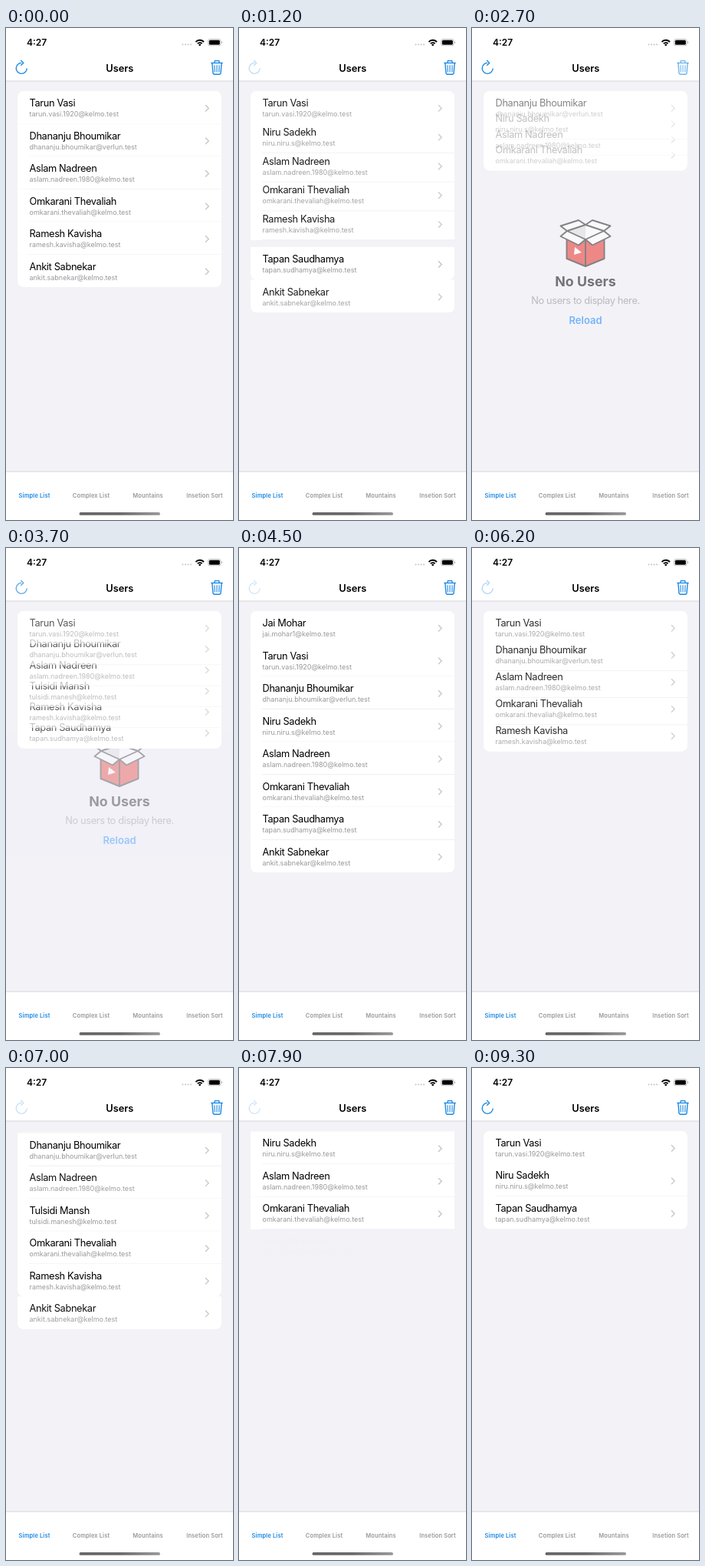
Write an HTML page with a canvas that moves like this. It is 296 px wide and 640 px high and loops after 9400 ms.

```html
<!DOCTYPE html>
<html lang="en">
<head>
<meta charset="utf-8">
<title>Users</title>
<style>
html, body { margin: 0; width: 100%; height: 100%; overflow: hidden; background: #f2f2f7; }
canvas { display: block; }
</style>
</head>
<body>
<canvas id="stage" width="296" height="640"></canvas>
<script>
const ctx = document.getElementById('stage').getContext('2d');
const LOOP = 9400, MOVE = 400, ROW = 42.5, TOP = 82;
const BLUE = '#1c88e2', BG = '#f2f2f7';

const users = [
  ['Jai Mohar', 'jai.mohar1@kelmo.test'],
  ['Tarun Vasi', 'tarun.vasi.1920@kelmo.test'],
  ['Dhananju Bhoumikar', 'dhananju.bhoumikar@verlun.test'],
  ['Niru Sadekh', 'niru.niru.s@kelmo.test'],
  ['Aslam Nadreen', 'aslam.nadreen.1980@kelmo.test'],
  ['Tulsidi Mansh', 'tulsidi.manesh@kelmo.test'],
  ['Omkarani Thevaliah', 'omkarani.thevaliah@kelmo.test'],
  ['Ramesh Kavisha', 'ramesh.kavisha@kelmo.test'],
  ['Tapan Saudhamya', 'tapan.sudhamya@kelmo.test'],
  ['Ankit Sabnekar', 'ankit.sabnekar@kelmo.test']
];

// Each tap: release time and the users shown afterwards; an empty list means the trash was tapped.
const taps = [
  [-2000, '124679'], [-1000, '124679'], [130, '02358'], [600, '1346789'], [1080, '0258'],
  [1580, '2346'], [2498, ''], [3480, '124578'], [4090, '01234689'], [4540, '13679'],
  [5010, '38'], [5540, '12467'], [6060, '03589'], [6440, '245679'], [6900, '023567'],
  [7375, '346'], [7848, '134679'], [8350, '02458'], [8910, '138']
].map(([time, ids]) => ({ time, ids: [...ids].map(Number) }));

const clamp = v => Math.max(0, Math.min(1, v));
const ease = p => p < .5 ? 4 * p ** 3 : 1 - 4 * (1 - p) ** 3;
const mix = (a, b, p) => a + (b - a) * p;

function text(str, x, y, size, color, weight = 400, align = 'left', spacing = 0) {
  ctx.font = `${weight} ${size}px Inter, sans-serif`;
  ctx.letterSpacing = spacing + 'px';
  ctx.textAlign = align;
  ctx.fillStyle = color;
  ctx.fillText(str, x, y);
}

function trace(points, close) {
  ctx.beginPath();
  for (let i = 0; i < points.length; i += 2) ctx.lineTo(points[i], points[i + 1]);
  if (close) ctx.closePath();
}

function line(points, color, width) {
  trace(points);
  ctx.strokeStyle = color;
  ctx.lineWidth = width;
  ctx.stroke();
}

function pill(x, y, w, h, r, fill) {
  ctx.beginPath();
  ctx.roundRect(x, y, w, h, r);
  ctx.fillStyle = fill;
  ctx.fill();
}

function withAlpha(alpha, draw) {
  ctx.save();
  ctx.globalAlpha = alpha;
  draw();
  ctx.restore();
}

// Slot in `list` just below the nearest row above `id` that is in both lists.
function slot(id, own, list) {
  const above = own.slice(0, own.indexOf(id)).filter(u => list.includes(u)).pop();
  return above === undefined ? 0 : list.indexOf(above) + 1;
}

function drawCard({ id, list, at }) {
  const first = id === list[0] ? 8 : 0, last = id === list.at(-1) ? 8 : 0;
  pill(15, TOP + at * ROW, 266, ROW, [first, first, last, last], '#fff');
}

function drawRow(row) {
  const { id, list, at } = row, y = TOP + at * ROW;
  drawCard(row);
  text(users[id][0], 30.5, y + 20, 12.8, '#000', 400, 'left', -.35);
  text(users[id][1], 30.5, y + 33, 9, '#97979b');
  line([260, y + 18.2, 264.2, y + 22.4, 260, y + 26.6], '#c2c2c6', 1.3);
  if (id !== list[0] && id !== list.at(-1)) line([30, y + ROW, 281, y + ROW], '#ededf0', .8);
}

// Upper rows overlap lower ones; the cards fade later than their contents.
function drawFading(rows, alpha) {
  if (alpha <= 0) return;
  withAlpha(Math.min(1, alpha * 2), () => rows.forEach(drawCard));
  withAlpha(alpha, () => rows.reverse().forEach(drawRow));
}

function drawList(from, to, p) {
  const inserted = to.filter(id => !from.includes(id));
  const deleted = from.filter(id => !to.includes(id));
  const kept = to.filter(id => from.includes(id));
  drawFading(inserted.map(id => ({ id, list: to, at: mix(slot(id, to, from), to.indexOf(id), p) })), p);
  drawFading(deleted.map(id => ({ id, list: from, at: mix(from.indexOf(id), slot(id, from, to), p) })), 1 - p);
  for (const id of kept) drawRow({ id, list: to, at: mix(from.indexOf(id), to.indexOf(id), p) });
}

function drawBox() {
  const shape = (points, fill) => {
    trace(points, true);
    ctx.fillStyle = fill;
    ctx.fill();
    ctx.strokeStyle = '#1c1c1e';
    ctx.lineWidth = 1.9;
    ctx.stroke();
  };
  const mirror = points => points.map((v, i) => i % 2 ? v : 296 - v);
  ctx.lineJoin = 'round';
  for (const side of [p => p, mirror]) {
    shape(side([123.5, 266, 148, 276, 148, 310, 123.5, 300]), '#e8261f');
    trace(side([148, 256, 124, 264, 148, 275]), true);
    ctx.fillStyle = side === mirror ? '#fff' : '#dcdce0';
    ctx.fill();
  }
  for (const side of [p => p, mirror]) {
    shape(side([148, 256, 139, 250, 115.5, 257.5, 124, 264]), '#fff');
    shape(side([124, 264, 148, 275, 139, 282.5, 115.5, 271]), '#fff');
  }
  trace([134, 285, 143, 292, 133, 295], true);
  ctx.fillStyle = '#fff';
  ctx.fill();
}

// Drawn solid and then veiled, so that overlapping shapes fade as one.
function drawEmpty(alpha) {
  if (alpha <= 0) return;
  drawBox();
  text('No Users', 148, 335.5, 17.8, '#000', 700, 'center');
  text('No users to display here.', 148, 358.5, 12.8, '#85858a', 400, 'center', -.35);
  text('Reload', 148, 385, 13, '#007aff', 600, 'center');
  withAlpha(1 - alpha, () => {
    ctx.fillStyle = BG;
    ctx.fillRect(0, 240, 296, 160);
  });
}

function drawRefresh() {
  ctx.beginPath();
  ctx.arc(20.2, 52.4, 7, 0, Math.PI * 1.5);
  ctx.strokeStyle = BLUE;
  ctx.lineWidth = 1.4;
  ctx.stroke();
  line([19.3, 42, 22.7, 45.4, 19.3, 48.8], BLUE, 1.4);
}

function drawTrash() {
  line([267.3, 45.5, 282.7, 45.5], BLUE, 1.4);
  line([271.8, 45, 272.3, 42.7, 277.7, 42.7, 278.2, 45], BLUE, 1.3);
  line([268.8, 45.5, 270, 59, 271.3, 60.3, 278.7, 60.3, 280, 59, 281.2, 45.5], BLUE, 1.4);
  for (const dx of [-2.8, 0, 2.8]) line([275 + dx * 1.1, 48.3, 275 + dx, 57.5], BLUE, 1.1);
}

function drawStatus() {
  text('4:27', 27, 23, 12, '#000', 600);
  for (let i = 0; i < 4; i++) pill(229.5 + i * 3.5, 20.5, 2, 2, 1, '#c5c5c7');
  ctx.strokeStyle = '#000';
  for (const r of [3.9, 7.2]) {
    ctx.lineWidth = 1.9;
    ctx.beginPath();
    ctx.arc(252.7, 23, r, -Math.PI * .76, -Math.PI * .24);
    ctx.stroke();
  }
  pill(251.4, 20.8, 2.6, 2.4, 1.2, '#000');
  pill(263.3, 14.2, 17, 9, 2.8, '#b4b4b6');
  pill(264, 14.9, 15.6, 7.6, 2.2, '#fff');
  pill(264.8, 15.7, 14, 6, 1.5, '#000');
  pill(280.8, 17.2, 1.2, 3, .6, '#b4b4b6');
}

function drawBars(refreshAlpha, trashAlpha) {
  ctx.fillStyle = '#fff';
  ctx.fillRect(0, 0, 296, 69);
  ctx.fillRect(0, 577, 296, 63);
  line([0, 69, 296, 69], '#d3d3d6', .9);
  line([0, 577, 296, 577], '#d3d3d6', .9);
  drawStatus();
  text('Users', 148.3, 57, 12.8, '#000', 600, 'center');
  withAlpha(refreshAlpha, drawRefresh);
  withAlpha(trashAlpha, drawTrash);
  ['Simple List', 'Complex List', 'Mountains', 'Insetion Sort'].forEach((label, i) =>
    text(label, 37 + i * 74, 611, 7.5, i ? '#98989c' : BLUE, 600, 'center', .12));
  const shade = ctx.createLinearGradient(95, 0, 201, 0);
  shade.addColorStop(0, '#666');
  shade.addColorStop(.5, '#6a6a6a');
  shade.addColorStop(1, '#999');
  pill(95.5, 630, 105.5, 3.8, 1.9, shade);
}

// Icons dim shortly before release, then fade back.
function iconAlpha(time, trash) {
  const mine = taps.filter(tap => trash === !tap.ids.length);
  if (mine.some(tap => time < tap.time && time > tap.time - (trash ? 20 : 65))) return .2;
  const tap = mine.filter(item => item.time <= time).pop();
  return tap ? mix(.2, 1, ease(clamp((time - tap.time) / MOVE))) : 1;
}

function render(time) {
  const now = taps.filter(tap => tap.time <= time).length - 1;
  const from = taps[now - 1].ids, to = taps[now].ids;
  const p = ease(clamp((time - taps[now].time) / MOVE));
  ctx.fillStyle = BG;
  ctx.fillRect(0, 0, 296, 640);
  drawEmpty(!to.length ? p : !from.length ? 1 - p : 0);
  drawList(from, to, p);
  drawBars(iconAlpha(time, false), iconAlpha(time, true));
}

function tick() {
  render(performance.now() % LOOP);
  requestAnimationFrame(tick);
}
tick();
</script>
</body>
</html>
```
